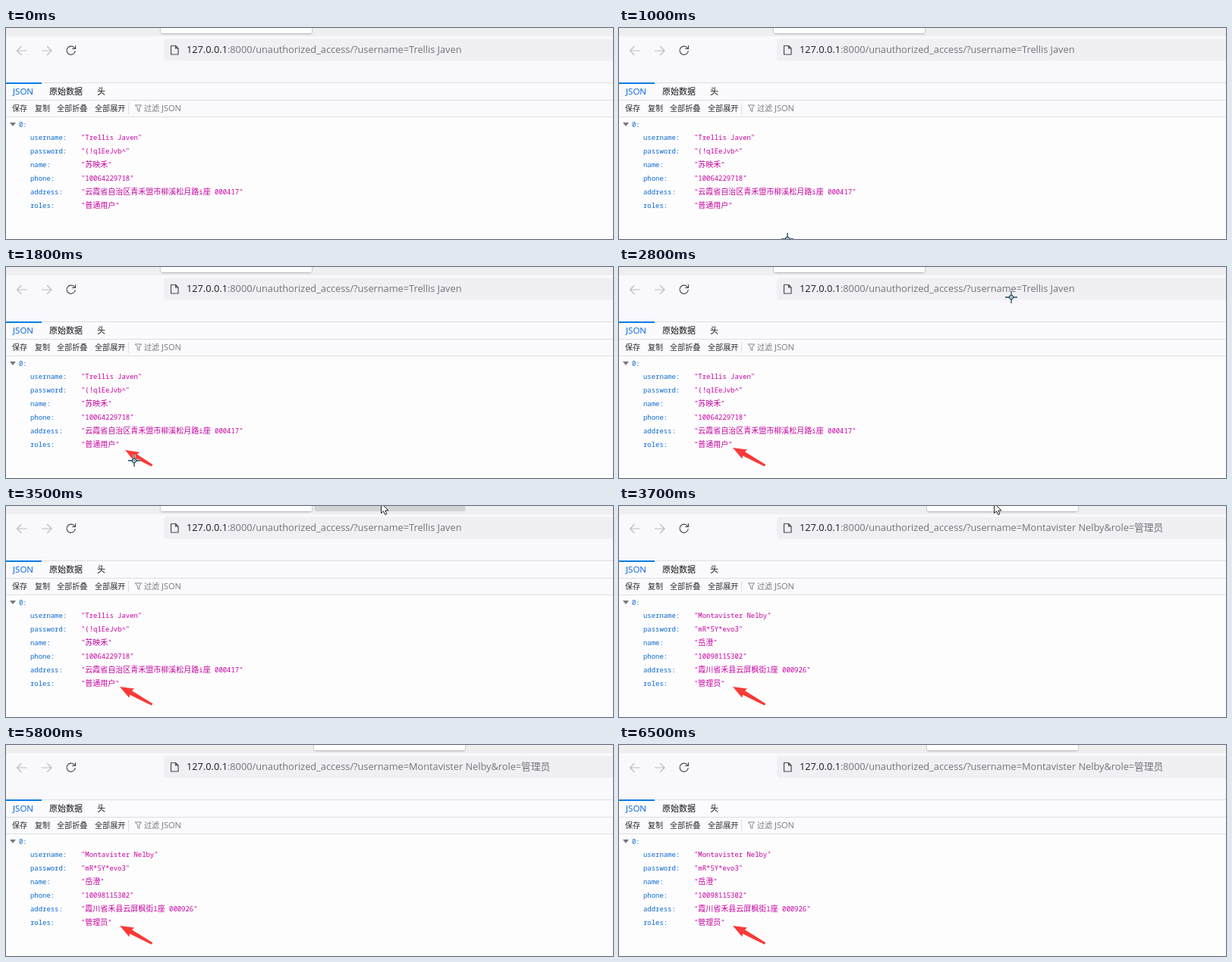
An HTML page that plays this animation: 800 by 279 pixels, repeating every 7.4 s.

```html
<!DOCTYPE html>
<html lang="zh">
<head>
<meta charset="utf-8">
<title>JSON viewer</title>
<style>
  html, body { margin: 0; width: 100%; height: 100%; overflow: hidden; background: #fefefe; }
  svg { display: block; width: 800px; height: 279px; }
  text { white-space: pre; }
  .ui { font-family: "Open Sans", "Noto Sans CJK SC", "Noto Sans CJK", sans-serif; fill: #0f0f11; }
  .url { font-size: 12.75px; fill: #737378; }
  .host { fill: #1c1b22; }
  .tabs { font-size: 11px; }
  .tools { font-size: 10.1px; fill: #2a2a30; }
  .tabs .active { font-size: 11.5px; fill: #0060df; }
  .tools .hint { fill: #77777c; }
  .json { font: 8.92px "Noto Sans Mono", "Noto Sans CJK SC", "Noto Sans CJK", monospace; }
  .cjk { font-size: 10px; }
  .key { fill: #0a68d0; }
  .value { fill: #c4009e; }
  .line { fill: none; stroke-width: 1.2; stroke-linecap: round; stroke-linejoin: round; }
</style>
</head>
<body>
<svg viewBox="0 0 800 279">
  <defs>
    <filter id="shade" x="-5%" y="-50%" width="110%" height="220%">
      <feDropShadow dx="0" dy="0.5" stdDeviation="1" flood-color="#000" flood-opacity=".4"/>
    </filter>
  </defs>

  <!-- browser chrome -->
  <rect width="800" height="279" fill="#fefdfe"/>
  <rect width="800" height="11" fill="#efeef1"/>
  <rect id="hover" x="406.5" y="-10" width="199" height="17" rx="3" fill="#d3d3d6"/>
  <rect id="tab" y="-10" width="199" height="17" rx="3" fill="#fff" filter="url(#shade)"/>
  <rect y="11" width="800" height="61" fill="#f9f8fc"/>
  <rect x="208" y="14.5" width="610" height="29" rx="4" fill="#f0eff4"/>
  <g class="line" stroke="#bcbcc1">
    <path d="M27 30H14.5M20 24.5L14.5 30L20 35.5"/>
    <path d="M47.5 30H60M54.5 24.5L60 30L54.5 35.5"/>
  </g>
  <path class="line" stroke="#46464d" d="M90.3 26.5A5.6 5.6 0 1 0 91.2 30.5M91.5 23.5V27.5H87.5"/>
  <path class="line" stroke="#4a4a50" d="M217.5 23.5H223.5L227 27V35H217.5ZM223.5 23.5V27H227"/>
  <text class="ui url" x="238" y="33.2"><tspan class="host">127.0.0.1</tspan>:8000/unauthorized_access/?username=<tspan id="query"></tspan></text>

  <!-- viewer bars -->
  <rect y="72" width="800" height="45" fill="#fbfbfd"/>
  <path d="M0 72.5H800M0 95.5H800M0 117.5H800" stroke="#dedee1"/>
  <rect y="72" width="47" height="2" fill="#0a7ee4"/>
  <g class="ui tabs">
    <text class="active" x="9" y="88.2">JSON</text>
    <text x="57" y="88.2">原始数据</text>
    <text x="120" y="88.2">头</text>
  </g>
  <g class="ui tools">
    <text x="8" y="109.8">保存</text>
    <text x="38" y="109.8">复制</text>
    <text x="67" y="109.8">全部折叠</text>
    <text x="117" y="109.8">全部展开</text>
    <text class="hint" x="182" y="109.8">过滤</text>
    <text class="hint" x="205" y="109.8" font-size="11">JSON</text>
  </g>
  <path d="M161.5 99V114" stroke="#dedee1"/>
  <path class="line" stroke="#85858a" style="stroke-width:1" d="M170.5 102H178.5L175.7 105.8V110.5L173.3 109V105.8Z"/>

  <!-- record -->
  <path d="M5 125H13L9 130Z" fill="#77777c"/>
  <text class="json key" x="17" y="130.5">0:</text>
  <g id="rows" class="json"></g>

  <path id="arrow" fill="#f93a36"/>

  <g id="cross">
    <path d="M-8 0H8M0 -8V8" stroke="#fff" stroke-width="3"/>
    <path d="M-8 0H8M0 -8V8" stroke="#1d4358" stroke-width="1.3"/>
    <circle r="2.6" fill="#e8f4f8" stroke="#1d4358" stroke-width="1.3"/>
    <circle r=".8" fill="#1d4358"/>
  </g>
  <path id="pointer" d="M0 0V13L3 10.3L5.2 15L7.4 14L5.3 9.5H9.5Z" fill="#fff" stroke="#222"/>
</svg>

<script>
const LOOP = 7400, SWITCH = 3700;
const $ = id => document.getElementById(id);
const show = (el, on) => el.style.display = on ? "" : "none";

const keys = ["username", "password", "name", "phone", "address", "roles"];
const pages = [
  {
    tabX: 204, query: "Trellis Javen",
    values: ["Trellis Javen", "(!q1EeJvb^", "苏映禾", "10064229718",
             "云霞省自治区青禾盟市柳溪松月路i座 000417", "普通用户"]
  },
  {
    tabX: 406, query: "Montavister Nelby&role=管理员",
    values: ["Montavister Nelby", "mR*5Y*evo3", "岳澄", "10098115302",
             "霞川省禾县云屏枫街l座 000926", "管理员"]
  }
];

// time, shape, x, y: each entry holds until the next
const cursor = [
  [0], [1000, "cross", 222, 279], [1100, "cross", 210, 274], [1200, "cross", 201, 270],
  [1300, "cross", 197, 269], [1400, "cross", 195, 268], [1600, "cross", 194, 267],
  [1700, "cross", 193, 267], [1800, "cross", 169, 256], [1900, "cross", 160, 248],
  [2000, "cross", 155, 242], [2100, "cross", 154, 240],
  [2300, "cross", 182, 225], [2400, "cross", 270, 176], [2500, "cross", 390, 106],
  [2600, "cross", 492, 54], [2700, "cross", 534, 40], [2800, "cross", 517, 40],
  [3000, "cross", 516, 37], [3100, "cross", 513, 30], [3200, "pointer", 508, 20],
  [3300, "pointer", 502, 8], [3400, "pointer", 497, 0], [3500, "pointer", 494.5, -3.5],
  [3900, "pointer", 470, 50], [4000, "cross", 390, 190], [4100],
  [4300, "cross", 293, 278], [4400, "cross", 293, 279], [4500]
];
const arrowTip = [[0], [1800, 157, 242], [1900, 152, 240], [2000, 150, 239]];
const arrowTail = [192.5, 262.5];

const at = (list, t) => list.findLast(k => k[0] <= t).slice(1);

function addText(parent, cls, x, y, str) {
  const make = name => document.createElementNS(parent.namespaceURI, name);
  const el = make("text");
  el.setAttribute("class", cls);
  el.setAttribute("x", x);
  el.setAttribute("y", y);
  for (const part of str.split(/([\u4e00-\u9fff]+)/)) {
    const span = make("tspan");
    span.textContent = part;
    if (part > "\u4e00") span.setAttribute("class", "cjk");
    el.append(span);
  }
  parent.append(el);
}

let current;
function showPage(page) {
  if (page === current) return;
  current = page;
  $("tab").setAttribute("x", page.tabX);
  $("query").textContent = page.query;
  $("rows").replaceChildren();
  keys.forEach((key, i) => {
    const y = 148.2 + 18 * i;
    addText($("rows"), "key", 32, y, key + ":");
    addText($("rows"), "value", 99, y, `"${page.values[i]}"`);
  });
}

function drawArrow([x, y]) {
  show($("arrow"), x !== undefined);
  if (x === undefined) return;
  const dx = arrowTail[0] - x, dy = arrowTail[1] - y, len = Math.hypot(dx, dy);
  const angle = Math.atan2(dy, dx) * 180 / Math.PI;
  $("arrow").setAttribute("d", `M0 0L18 -7L16.5 -3L${len} -1.5V1.5L16.5 3L18 7Z`);
  $("arrow").setAttribute("transform", `translate(${x} ${y}) rotate(${angle})`);
}

function draw(t) {
  showPage(pages[t < SWITCH ? 0 : 1]);
  show($("hover"), t >= 3400 && t < SWITCH);
  drawArrow(at(arrowTip, t));
  const [shape, x, y] = at(cursor, t);
  for (const id of ["cross", "pointer"]) {
    show($(id), id === shape);
    if (id === shape) $(id).setAttribute("transform", `translate(${x} ${y})`);
  }
}

const start = performance.now();
function tick() {
  draw((performance.now() - start) % LOOP);
  requestAnimationFrame(tick);
}
tick();
</script>
</body>
</html>
```
